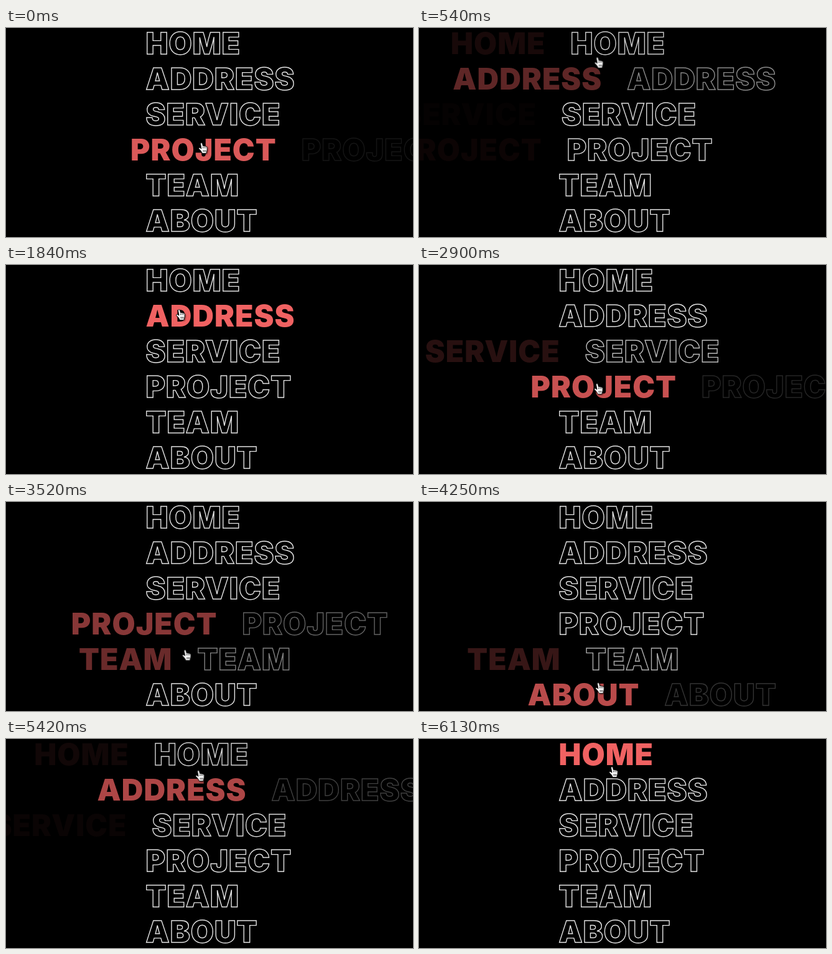
Recreate the animation shown at these times as an HTML page without scripts. Size 654 by 336 pixels, loop 6.53 s.

```html
<!DOCTYPE html>
<html lang="en">
<head>
<meta charset="utf-8">
<title>Menu</title>
<style>
/* --p: 0 = outlined at rest, 1 = fully highlighted */
@property --p { syntax: "<number>"; inherits: true; initial-value: 0; }

html, body { margin: 0; width: 100%; height: 100%; background: #000; }
main { position: relative; width: 100%; height: 100%; overflow: clip; contain: strict; }

ul {
  position: absolute; left: 204.5px; top: -4px;
  margin: 0; padding: 0; list-style: none;
  font: 900 48px/57px Inter, sans-serif;
  letter-spacing: 1px;
  white-space: nowrap;
}
li { position: relative; height: 57px; animation: 6530ms ease infinite; }
span { position: absolute; left: 0; top: 0; padding: 0 20px; }
.line {
  color: transparent; -webkit-text-stroke: 1.4px #e4e4e4;
  opacity: calc(1 - var(--p));
  transform: translateX(calc(var(--p) * 100%));
}
.fill {
  color: #f06262;
  opacity: var(--p);
  transform: translateX(calc((var(--p) - 1) * 100%));
}

.home { animation-name: home; }
.address { animation-name: address; }
.service { animation-name: service; }
.project { animation-name: project; }
.team { animation-name: team; }
.about { animation-name: about; }

@keyframes home {
  0%, 7.5% { --p: 0; }
  15.16%, 20.06% { --p: 1; }
  27.72%, 82.39% { --p: 0; }
  90.05%, 100% { --p: 1; }
}
/* the odd curve is the first part of an ease that gets cut short */
@keyframes address {
  0% { --p: 0; }
  5.11% { --p: 0; animation-timing-function: cubic-bezier(.4,.09,.6,.56); }
  7.5% { --p: .54; }
  11.62%, 20.06% { --p: 0; }
  27.72%, 30.78% { --p: 1; }
  38.44% { --p: 0; }
  78.56% { --p: 0; animation-timing-function: cubic-bezier(.35,.09,.46,.66); }
  82.39% { --p: .8; }
  88.53%, 100% { --p: 0; }
}
@keyframes service {
  0% { --p: 0; }
  2.73% { --p: 0; animation-timing-function: cubic-bezier(.4,.09,.6,.56); }
  5.11% { --p: .54; }
  9.23%, 30.78% { --p: 0; }
  38.44%, 40.32% { --p: 1; }
  47.98% { --p: 0; }
  74.73% { --p: 0; animation-timing-function: cubic-bezier(.35,.09,.46,.66); }
  78.56% { --p: .8; }
  84.7%, 100% { --p: 0; }
}
@keyframes project {
  0% { --p: .91; animation-timing-function: ease-out; }
  2.73% { --p: 1; }
  10.38%, 40.32% { --p: 0; }
  47.98%, 51.91% { --p: 1; }
  59.57% { --p: 0; }
  71.52% { --p: 0; animation-timing-function: cubic-bezier(.37,.09,.5,.62); }
  74.73% { --p: .71; }
  80.17%, 100% { --p: 0; }
}
@keyframes team {
  0%, 51.91% { --p: 0; }
  59.57%, 61.49% { --p: 1; }
  69.14% { --p: 0; }
  70.29% { --p: 0; animation-timing-function: cubic-bezier(.4,.12,.7,.5); }
  71.52% { --p: .2; }
  73.08%, 100% { --p: 0; }
}
@keyframes about {
  0%, 61.49% { --p: 0; }
  69.14%, 70.29% { --p: 1; }
  77.95%, 100% { --p: 0; }
}

.hand {
  position: absolute; left: -.5px; top: 0; overflow: visible;
  filter: drop-shadow(1px 1px 1px #0009);
  animation: hand 6530ms linear infinite;
}
@keyframes hand {
  0%, 1.23% { transform: translate(309px, 184px); }
  2.73% { transform: translate(305px, 167px); }
  5.11% { transform: translate(295px, 110px); }
  7.5% { transform: translate(284px, 53px); }
  10.57% { transform: translate(274px, 28px); }
  15.31%, 18.68% { transform: translate(270px, 23px); }
  20.06% { transform: translate(270px, 53px); }
  23% { transform: translate(272px, 71px); }
  28.18%, 29.5% { transform: translate(273px, 71px); }
  30.78% { transform: translate(275px, 110px); }
  33.7% { transform: translate(278px, 130px); }
  39.66% { transform: translate(279px, 150px); }
  40.32% { transform: translate(280px, 167px); }
  44.41% { transform: translate(281px, 190px); }
  50.5% { transform: translate(281px, 200px); }
  51.91% { transform: translate(282px, 224px); }
  55.1% { transform: translate(283px, 245px); }
  60.5% { transform: translate(283px, 262px); }
  61.49% { transform: translate(283px, 281px); }
  65.08% { transform: translate(283px, 290px); }
  69% { transform: translate(285px, 298px); }
  70.29% { transform: translate(288px, 281px); }
  71.52% { transform: translate(293px, 224px); }
  74.58% { transform: translate(302px, 170px); }
  78.56% { transform: translate(303px, 110px); }
  82.39% { transform: translate(304px, 53px); }
  86%, 93.87% { transform: translate(305px, 36px); }
  93.88%, 100% { transform: translate(305px, 44px); }
}
</style>
</head>
<body>
<main>
  <ul>
    <li class="home"><span class="line">HOME</span><span class="fill" aria-hidden="true">HOME</span></li>
    <li class="address"><span class="line">ADDRESS</span><span class="fill" aria-hidden="true">ADDRESS</span></li>
    <li class="service"><span class="line">SERVICE</span><span class="fill" aria-hidden="true">SERVICE</span></li>
    <li class="project"><span class="line">PROJECT</span><span class="fill" aria-hidden="true">PROJECT</span></li>
    <li class="team"><span class="line">TEAM</span><span class="fill" aria-hidden="true">TEAM</span></li>
    <li class="about"><span class="line">ABOUT</span><span class="fill" aria-hidden="true">ABOUT</span></li>
  </ul>
  <svg class="hand" width="15" height="18" viewBox="0 0 14 17">
    <path d="M3.2 1.6Q4.6-.4 6 1.4L7 5.6Q8.2 4.6 9.2 5.8Q10.4 5 11.3 6.2Q13 5.8 13.4 7.6L13.2 11.5L12 16.5H6L4 13L.6 9.4Q.4 7.4 2.4 8L4.6 9.6Z" fill="#fff" stroke="#000" stroke-width=".8"/>
    <path d="M7 6.5V9M9.2 6.5V9M11.3 7V9M7.5 11.5V14.5M9.3 11.5V14.5M11 11.5V14.5" stroke="#000" stroke-width=".7"/>
  </svg>
</main>
</body>
</html>
```
